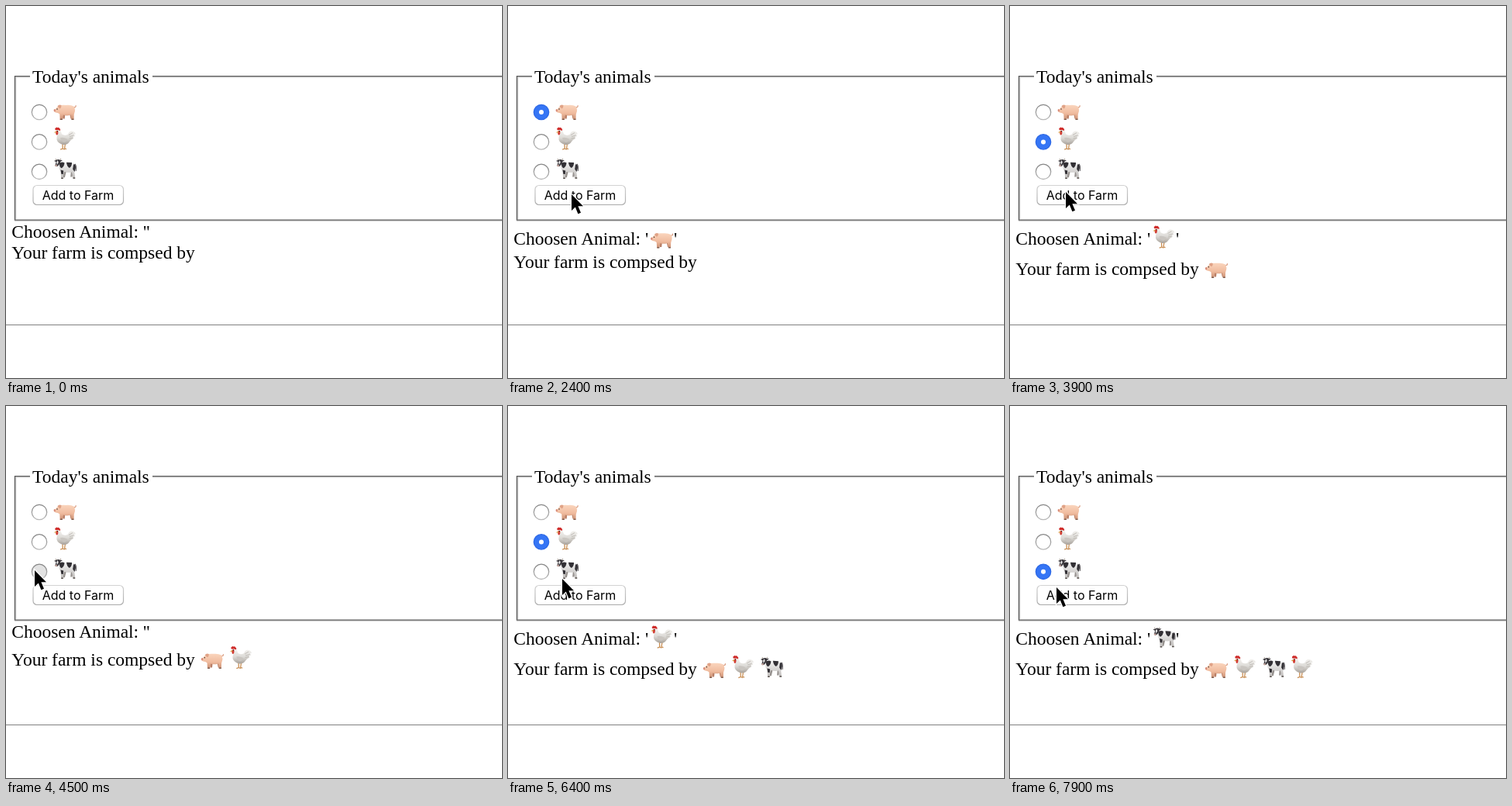
An HTML page that plays this animation: 640 by 480 pixels, repeating every 8000 ms.

```html
<!DOCTYPE html>
<html lang="en">
<head>
<meta charset="utf-8">
<title>Today's animals</title>
<style>
  html, body { margin: 0; width: 100%; height: 100%; overflow: hidden; background: #fff; }
  svg { display: block; width: 640px; height: 480px; }
  text { font: 23.5px "Liberation Serif", "Times New Roman", serif; fill: #000; }
  .button-label { font: 16px Inter, sans-serif; text-anchor: middle; }
  .radio { fill: #fff; stroke: url(#rim); stroke-width: 1.3; }
  .radio.pressed { fill: #e2e2e2; }
  .radio.checked { fill: #3575f5; stroke: #2e69e6; }
  .dot { fill: #fff; visibility: hidden; }
  .checked + .dot { visibility: visible; }
</style>
</head>
<body>
<svg viewBox="0 0 640 480">
  <defs>
    <linearGradient id="rim" x2="0" y2="1">
      <stop stop-color="#858585"/><stop offset="1" stop-color="#b9b9b9"/>
    </linearGradient>
    <linearGradient id="edge" x2="0" y2="1">
      <stop stop-color="#d2d2d2"/><stop offset="1" stop-color="#aaa"/>
    </linearGradient>
    <linearGradient id="skin" x2="0" y2="1">
      <stop stop-color="#fad5bd"/><stop offset=".55" stop-color="#f0bc9f"/><stop offset="1" stop-color="#c98d70"/>
    </linearGradient>
    <linearGradient id="feather" x2="0" y2="1">
      <stop stop-color="#f7f6f3"/><stop offset=".55" stop-color="#dcdad6"/><stop offset="1" stop-color="#a8a29b"/>
    </linearGradient>
    <linearGradient id="hide" x2="0" y2="1">
      <stop stop-color="#f4f4f4"/><stop offset="1" stop-color="#bdbab8"/>
    </linearGradient>

    <!-- Animals share a 30 by 30 cell -->
    <g id="pig">
      <path d="M11 21l1.500 7h2.200l.8-7zM21 21l1.500 7h2.200l.5-8z" fill="#b97f66"/>
      <path d="M1 17.200Q1 15.500 3 15.300Q4.500 12.500 7 11.500Q11 9.700 16 10.300Q23 9.600 26.500 12Q28.400 14 28 18L26.700 22.500 26.500 29H23.400L22.500 23Q17 24.700 13 23L11.800 29.300H8.700L8.200 22Q6.500 20.500 4.500 20.200Q1.500 20 1 17.200Z" fill="url(#skin)"/>
      <path d="M27 13q2.600.2 2-2.400" fill="none" stroke="#d99c80" stroke-width="1.200"/>
      <path d="M5.500 11.500Q7.500 9 10.500 10.500Q10.600 13.400 8.700 14.800Q6.500 14 5.500 11.500Z" fill="#e0a286"/>
      <ellipse cx="1.800" cy="17.200" rx="1.200" ry="1.700" fill="#d88c7a"/>
      <circle cx="5" cy="15.300" r=".75" fill="#33221c"/>
      <path d="M8.800 28h3v1.400h-3zM23.500 28h3v1.400h-3z" fill="#806052"/>
    </g>
    <g id="chicken">
      <path d="M12 22l.2 6-3 1.200M12.200 28l2.600 1.200M15.500 21.500l-1 6.300M14.500 27.800l2.500.8" fill="none" stroke="#c98f55" stroke-width="1.300"/>
      <path d="M4.300 5Q6 2.700 8.500 4Q10.500 6 11 9.200Q14.500 12 19 9.500Q21 4.500 25 5.500Q28.500 6.500 28.800 9.500L26.800 9.300 28 12.200 25.800 12.300 26 15Q22.500 16.500 21 19Q18.500 23.300 13 22.900Q6 21.500 4.500 16.500Q4 13 5.500 10Z" fill="url(#feather)"/>
      <path d="M9 14Q13.500 13 18 15.500Q17 20.500 12.500 19.500Q9.800 18 9 14Z" fill="#c9c5c0"/>
      <path d="M20 10.500l5-3M21 12.500l5.500-1.500M20.500 15l4.500-1" stroke="#b8b4ae" stroke-width=".8"/>
      <path d="M3 4.300Q1.300 2 3.300 1.300Q4 .1 5.600 1Q7.700.3 8 2Q9.800 2.600 8.700 5Q6.800 3.500 3 4.300Z" fill="#cf2d2b"/>
      <path d="M3.400 5.400Q6.600 4.300 6.400 7.200Q6.200 10.800 4.200 10.500Q2.700 9 3.400 5.400Z" fill="#d23c34"/>
      <path d="M4 5.300L.9 7.300 3.800 7.800Z" fill="#dba34c"/>
      <circle cx="5.500" cy="5.500" r=".7" fill="#2b1b14"/>
    </g>
    <g id="cow">
      <path d="M14 18l-1.500 8.800h2.400L17 18zM23 17l-.8 9h2.300l1.700-9z" fill="#96918e"/>
      <path d="M9 8.300Q13 6.300 18 7.300L27 8Q29 9.500 28.500 15L27.300 19 28.200 28H25.400L24 20Q19 21 15 19.500L13.300 20 12.800 28.300H10.200L9.500 19Q6.700 15.500 7 11Z" fill="url(#hide)"/>
      <path d="M8 8Q12 6 14.500 8Q14 13 10.500 14.800Q7.500 13 8 8ZM17 7.300L24 7.700Q24.300 12.500 20.800 14.500Q17.500 12.500 17 7.300ZM26 10Q29.500 8.700 28.800 15L27.500 19.500 25.200 16ZM9.500 17l3.700 1-.4 4.500-2.500-.2Z" fill="#323035"/>
      <path d="M28 9.500Q30 11 29.200 18.500" fill="none" stroke="#49464a" stroke-width="1.100"/>
      <path d="M1 5.500L4 4.200Q6.700 3 9 4.300L12 4.500 9.300 6.600Q8.500 10 5.700 12.300Q3.200 13.300 2.300 11.500Q3.600 8.500 3.500 6.700Z" fill="#39363b"/>
      <path d="M5.800 4.500L6.700 7.500 4.600 10.500 4.300 7Z" fill="#eee"/>
      <path d="M2.300 11.300Q3.200 9.700 5.400 11.200Q4.500 13.300 2.800 12.900Z" fill="#c6a49c"/>
      <path d="M3.900 4.500Q2.700 3.800 3.400 2.500M8.200 4.200Q10 3.800 9.600 2.400" fill="none" stroke="#aaa095" stroke-width="1"/>
      <path d="M10.200 27h2.600v1.500h-2.600zM25.500 26.800h2.700v1.500h-2.700z" fill="#57504c"/>
    </g>
  </defs>

  <g fill="none" stroke-width="1.300">
    <path d="M31 91.800H12.800V275M189 91.800H640M11 277.400H640" stroke="#d5d5d5"/>
    <path d="M31 90.600H11.500V276.200H640M189 90.600H640" stroke="#555"/>
  </g>
  <text x="34" y="98.500">Today's animals</text>

  <g id="options"></g>

  <rect x="35" y="231.500" width="116.500" height="25" rx="5" fill="#fff" stroke="url(#edge)" stroke-width="1.200"/>
  <text class="button-label" x="93" y="250">Add to Farm</text>

  <g id="chosen">
    <text x="7.300">Choosen Animal: '<tspan id="quote">'</tspan></text>
    <use id="pick" x="183.500" y="-25"/>
  </g>
  <g id="farm"><text x="7.300">Your farm is compsed by</text></g>
  <path d="M0 411.500H640" stroke="#808080"/>

  <path id="cursor" d="M0 0V21L4.800 16.600 8.400 25.200 12 23.700 8.400 15.300H15Z"
        stroke="#fff" stroke-width="2.400" paint-order="stroke"/>
</svg>
<script>
const LOOP = 8000, STEP = 100;
const animals = ["pig", "chicken", "cow"];
// Each round: animal index, then press, pick and add times
const rounds = [
  [0, 1400, 1600, 2500],
  [1, 3100, 3300, 4000],
  [2, 4400, 4600, 5200],
  [1, 5700, 5900, 6800],
  [2, 7400, 7600, 8400]
].map(([animal, press, pick, add]) => ({ animal, press, pick, add }));

// Cursor stops: time, x, y
const stops = [
  [400, 257, 384], [1200, 47, 134], [1400, 43, 132], [1600, 43, 132],
  [2300, 82, 243], [2600, 82, 243], [3100, 46, 171], [3400, 46, 171],
  [3900, 72, 240], [4100, 72, 240], [4400, 37, 212], [4700, 37, 212],
  [5100, 66, 241], [5300, 66, 241], [5600, 54, 188], [5800, 45, 172],
  [6000, 45, 172], [6400, 70, 223], [6600, 76, 240], [6900, 76, 240],
  [7400, 41, 210], [7600, 41, 210], [7900, 60, 234], [8000, 62, 238]
];

const $ = id => document.getElementById(id);
const place = (node, x, y) => node.setAttribute("transform", `translate(${x} ${y})`);
const show = (node, on) => node.setAttribute("visibility", on ? "visible" : "hidden");

function add(parent, tag, attrs) {
  const node = document.createElementNS("http://www.w3.org/2000/svg", tag);
  for (const key in attrs) node.setAttribute(key, attrs[key]);
  return parent.appendChild(node);
}

const radios = animals.map((name, i) => {
  const cy = 137 + i * 38.4;
  const radio = add($("options"), "circle", { class: "radio", cx: 43, cy, r: 9.7 });
  add($("options"), "circle", { class: "dot", cx: 43, cy, r: 3 });
  add($("options"), "use", { href: "#" + name, x: 61, y: cy - 19.4 });
  return radio;
});

const herd = rounds.map(({ animal }, i) =>
  add($("farm"), "use", { href: "#" + animals[animal], x: 251.3 + i * 36.8, y: -25 }));

function cursorAt(t) {
  const i = stops.findIndex(stop => stop[0] > t);
  const [t0, x0, y0] = stops[i - 1], [t1, x1, y1] = stops[i];
  const p = (t - t0) / (t1 - t0), k = p * p * (3 - 2 * p);
  return [x0 + (x1 - x0) * k, y0 + (y1 - y0) * k];
}

function draw(t) {
  const pressed = rounds.find(r => t >= r.press && t < r.pick);
  const picked = rounds.find(r => t >= r.pick && t < r.add);
  radios.forEach((radio, i) => {
    radio.classList.toggle("pressed", pressed?.animal === i);
    radio.classList.toggle("checked", picked?.animal === i);
  });

  place($("chosen"), 0, picked ? 308 : 299);
  show($("pick"), picked);
  if (picked) {
    $("pick").setAttribute("href", "#" + animals[picked.animal]);
    $("quote").setAttribute("x", 214);
  } else {
    $("quote").removeAttribute("x");
  }

  const hasHerd = t >= rounds[0].add;
  place($("farm"), 0, 325.5 + (picked ? 12 : 0) + (hasHerd ? 9 : 0));
  herd.forEach((node, i) => show(node, t >= rounds[i].add));

  const moving = t >= stops[0][0];
  show($("cursor"), moving);
  if (moving) place($("cursor"), ...cursorAt(t));
}

function tick() {
  const t = performance.now() % LOOP;
  draw(Math.floor(t / STEP) * STEP);
  requestAnimationFrame(tick);
}
tick();
</script>
</body>
</html>
```
